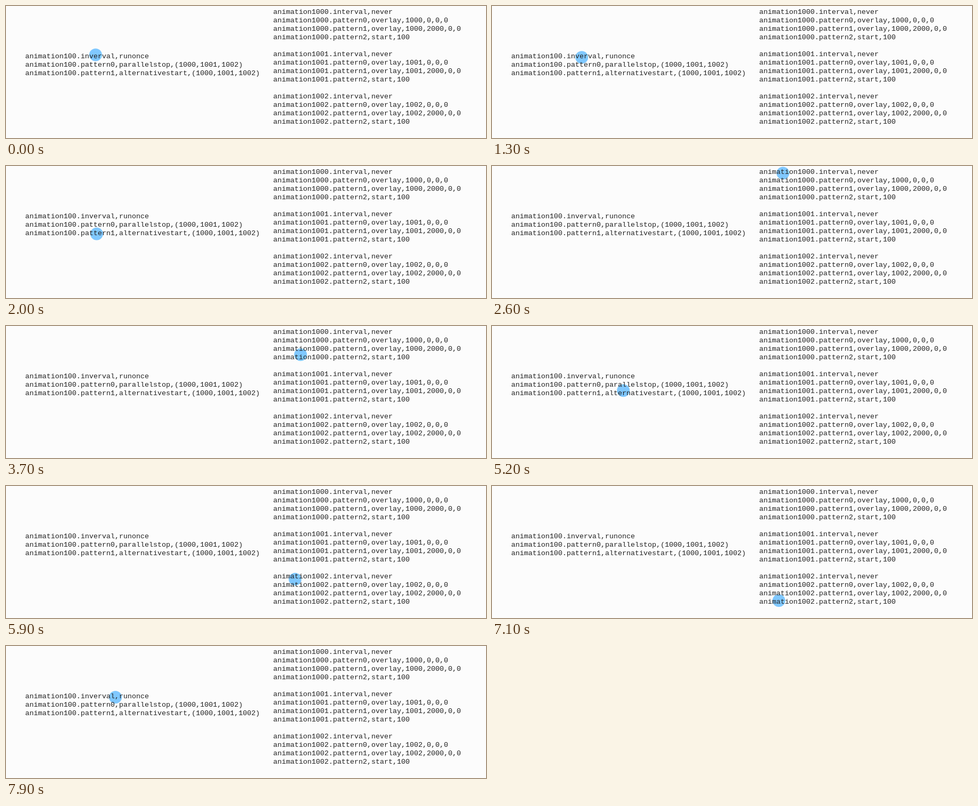
Recreate the animation shown at these times as an HTML page. Size 900 by 250 pixels, loop 8000 ms.

```html
<!DOCTYPE html>
<html lang="en">
<head>
<meta charset="utf-8">
<title>Animation patterns</title>
<style>
html, body { margin: 0; width: 100%; height: 100%; overflow: hidden; background: #fcfcfc; }
svg { display: block; }
text { font: 13.333px "Liberation Mono", "Courier New", monospace; fill: #222; }
</style>
</head>
<body>
<svg id="stage" width="900" height="250">
  <circle id="pointer" r="12" fill="#80c8ff"/>
</svg>
<script>
const LOOP = 8000, STEP = 100;
const NUDGE = 300, NUDGE_PERIOD = 500;
const stage = document.getElementById("stage");
const pointer = document.getElementById("pointer");

function block(x, y, name, lines) {
  lines.forEach((line, i) => {
    const text = document.createElementNS("http://www.w3.org/2000/svg", "text");
    text.setAttribute("x", x);
    text.setAttribute("y", y + 16 * i);
    text.textContent = `${name}.${line}`;
    stage.append(text);
  });
}

block(36, 99, "animation100", [
  "inverval,runonce",
  "pattern0,parallelstop,(1000,1001,1002)",
  "pattern1,alternativestart,(1000,1001,1002)"
]);
[1000, 1001, 1002].forEach((id, i) => block(501, 15 + 80 * i, "animation" + id, [
  "interval,never",
  `pattern0,overlay,${id},0,0,0`,
  `pattern1,overlay,${id},2000,0,0`,
  "pattern2,start,100"
]));

// The pointer sweeps to each block, rests, then nudges down it line by line
const visits = [
  { arrive: 0, rest: 1200, x: 168, y: 92.5, dx: 1, dy: 18, nudges: 2 },
  { arrive: 2600, rest: 0, x: 545.5, y: 13.5, dx: 3, dy: 18, nudges: 3 },
  { arrive: 4500, rest: 0, x: 241, y: 97, dx: 3, dy: 14.5, nudges: 2 },
  { arrive: 5700, rest: 200, x: 542, y: 176.5, dx: -1.5, dy: 14.8, nudges: 3 },
  { arrive: 7700, rest: 0, x: 200, y: 84.5, dx: 7, dy: 17, nudges: 1 }
];

const clamp = v => Math.min(1, Math.max(0, v));
const ease = v => v * v * (3 - 2 * v);
const mix = (a, b, k) => a + (b - a) * k;

function nudged({ arrive, rest, x, y, dx, dy, nudges }, t) {
  let count = 0;
  for (let i = 0; i < nudges; i++) {
    count += ease(clamp((t - arrive - rest - i * NUDGE_PERIOD) / NUDGE));
  }
  return [x + dx * count, y + dy * count];
}

function position(t) {
  const i = visits.findLastIndex(visit => visit.arrive <= t);
  const visit = visits[i], next = visits[i + 1];
  const [x, y] = nudged(visit, t);
  if (!next) return [x, y];
  const leave = visit.arrive + visit.rest + (visit.nudges - 1) * NUDGE_PERIOD + NUDGE;
  const k = ease(clamp((t - leave) / (next.arrive - leave)));
  return [mix(x, next.x, k), mix(y, next.y, k ** 1.3)]; // height lags, bending the sweep
}

function draw(now) {
  const [x, y] = position(Math.floor(now % LOOP / STEP) * STEP);
  pointer.setAttribute("cx", x);
  pointer.setAttribute("cy", y);
  requestAnimationFrame(draw);
}
draw(0);
</script>
</body>
</html>
```
